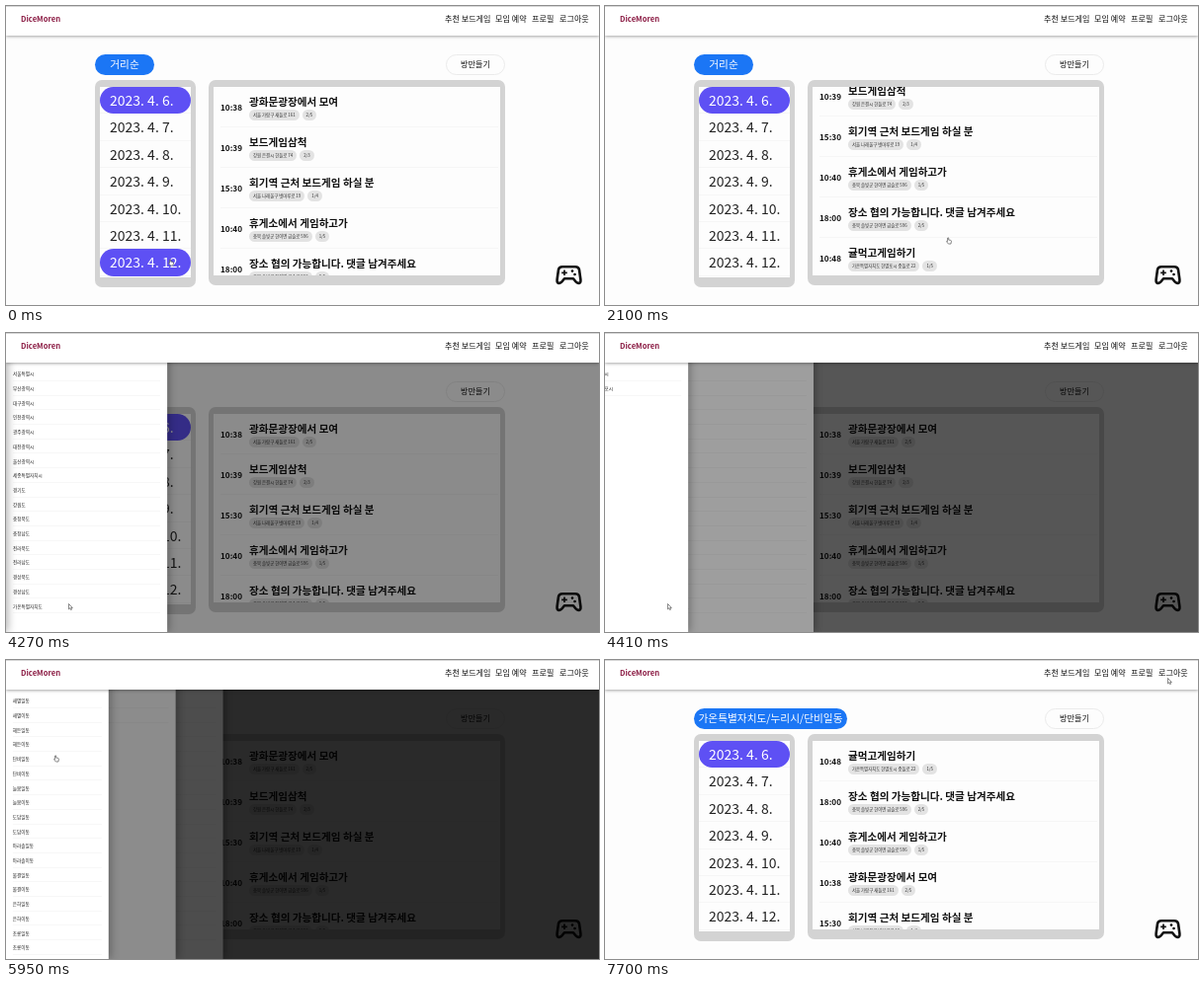
An HTML page for the animation above (7.91 s loop, 600 px wide and 303 px high).

```html
<!DOCTYPE html>
<html>
<head>
<meta charset="utf-8">
<style>
html, body { margin: 0; width: 100%; height: 100%; overflow: hidden; }
* { box-sizing: border-box; }
#stage {
  position: relative; width: 600px; height: 303px; overflow: hidden;
  background: #fdfdfd; color: #111; white-space: nowrap;
  font-family: "Noto Sans CJK KR", "Noto Sans CJK", "Noto Sans", sans-serif;
}
#stage div, #stage svg, header, header span { position: absolute; }
#stage .anim, .drawer, .mask, .swap-out, .swap-in, #cursor, #cursor path {
  animation-duration: 7910ms; animation-iteration-count: infinite;
}

header {
  left: 0; top: 0; width: 600px; height: 30px; background: #fff;
  border-top: 1px solid #d9d9d9; box-shadow: 0 1px 3px rgba(0,0,0,.35);
  font-size: 8.1px; font-weight: 500; line-height: 12px;
}
header span { top: 6px; }
header .logo { left: 15px; font-weight: 700; font-size: 7.7px; color: #8c1d45; }

.button { top: 49px; height: 21px; border-radius: 11px; line-height: 20px; text-align: center; }
.place { left: 90px; background: #1b76f5; color: #fff; font-size: 10.7px; font-weight: 500; }
.make { left: 445px; width: 60px; background: #fdfdfd; border: 1px solid #ebebeb; font-size: 8.1px; line-height: 18px; font-weight: 500; }

.panel { top: 75px; background: #d3d3d3; border-radius: 7px; }
.view { background: #fdfdfd; overflow: hidden; }
.date, .pill { left: 0; width: 92px; height: 27.4px; padding-left: 10px; font-size: 14px; line-height: 26px; }
.date { color: #222; border-bottom: 1px solid #f6f6f6; }
.pill { border-radius: 14px; background: #5e50f4; color: #fff; }

.list { left: 0; top: 0; width: 290px; height: 246px; }
.row { left: 7px; width: 281px; height: 41px; border-bottom: 1px solid #f6f6f6; }
.time { left: 0; top: 14px; font-size: 8.2px; font-weight: 700; line-height: 13px; }
.title { left: 29px; top: 7px; font-size: 10.6px; font-weight: 900; line-height: 15px; }
.tags { left: 29px; top: 23px; display: flex; gap: 3px; font-size: 4.4px; line-height: 10px; }
.tags span { height: 10.5px; padding: 0 4px; border-radius: 6px; background: #e3e3e3; color: #333; }

.mask { left: 0; top: 0; width: 600px; height: 303px; background: #000; opacity: 0; }
.drawer { left: 0; top: 0; height: 303px; background: #fff; box-shadow: 2px 0 8px rgba(0,0,0,.3); visibility: hidden; }
.item { left: 7px; right: 7px; height: 14.7px; font-size: 4.6px; line-height: 14px; color: #222; border-bottom: 1px solid #f7f7f7; }

.hover { animation-name: hover; }
@keyframes hover { 0%, 12.39% { opacity: 1; } 13.27%, 100% { opacity: 0; } }

.scroll { animation-name: scroll; animation-timing-function: ease-out; }
@keyframes scroll {
  0%, 15.04% { translate: 0 0; }
  19.47%, 21.24% { translate: 0 -42px; }
  23.01%, 26.7% { translate: 0 -52px; }
  30.09%, 100% { translate: 0 0; }
}

.swap-out { animation-name: swap-out; animation-timing-function: step-end; }
.swap-in { animation-name: swap-in; animation-timing-function: step-end; }
@keyframes swap-out { 0% { visibility: visible; } 75.6%, 100% { visibility: hidden; } }
@keyframes swap-in { 0% { visibility: hidden; } 75.6%, 100% { visibility: visible; } }

#mask1 { animation-name: dim1; }
#mask2 { animation-name: dim2; }
#mask3 { animation-name: dim3; }
@keyframes dim1 { 0%, 35.4% { opacity: 0; } 38.3%, 75.22% { opacity: .45; } 78.1%, 100% { opacity: 0; } }
@keyframes dim2 { 0%, 53.98% { opacity: 0; } 57.27%, 75.22% { opacity: .45; } 78.1%, 100% { opacity: 0; } }
@keyframes dim3 { 0%, 64.6% { opacity: 0; } 67.89%, 75.22% { opacity: .45; } 78.1%, 100% { opacity: 0; } }

#drawer1 { width: 162.5px; animation-name: slide1; }
#drawer2 { width: 100px; animation-name: slide2; }
#drawer3 { width: 104px; animation-name: slide3; }
@keyframes slide1 {
  0%, 35.4% { translate: -100% 0; visibility: hidden; }
  38.3%, 53.98% { translate: 0 0; visibility: visible; }
  57.27%, 75.22% { translate: 57px 0; visibility: visible; }
  78.1%, 100% { translate: -100% 0; visibility: hidden; }
}
@keyframes slide2 {
  0%, 53.98% { translate: -100% 0; visibility: hidden; }
  57.27%, 64.6% { translate: 0 0; visibility: visible; }
  67.89%, 75.22% { translate: 72px 0; visibility: visible; }
  78.1%, 100% { translate: -100% 0; visibility: hidden; }
}
@keyframes slide3 {
  0%, 64.6% { translate: -100% 0; visibility: hidden; }
  67.89%, 75.22% { translate: 0 0; visibility: visible; }
  78.1%, 100% { translate: -100% 0; visibility: hidden; }
}

#cursor { left: 0; top: 0; animation-name: move; animation-timing-function: ease-in-out; }
#cursor path { fill: #fff; stroke: #444; stroke-width: .8; stroke-linejoin: round; animation-timing-function: step-end; }
#cursor .hand { animation-name: hand; }
#cursor .arrow { animation-name: arrow; }
@keyframes move {
  0%, 12.39% { translate: 164px 256px; }
  13.27%, 14.16% { translate: 196px 273px; }
  15.04%, 30.09% { translate: 345px 234px; }
  34.51%, 39.8% { translate: 117px 59px; }
  51.3%, 57.27% { translate: 63px 274px; }
  61.95%, 68.27% { translate: 40px 43px; }
  73.45%, 78.76% { translate: 48px 96px; }
  84.96%, 85.84% { translate: 228px 119px; }
  87.6% { translate: 290px 178px; }
  89.38%, 91.15% { translate: 346px 150px; }
  97.1%, 100% { translate: 569px 18px; }
}
@keyframes hand { 0% { opacity: 1; } 30.1% { opacity: 0; } 75.2% { opacity: 1; } 92%, 100% { opacity: 0; } }
@keyframes arrow { 0% { opacity: 0; } 30.1% { opacity: 1; } 75.2% { opacity: 0; } 92%, 100% { opacity: 1; } }
</style>
</head>
<body>
<div id="stage"></div>
<script>
const meetings = [
  ["10:38", "광화문광장에서 모여", "서울 가람구 새들로 161", "2/5"],
  ["10:39", "보드게임삼척", "강원 은결시 한들로 74", "2/3"],
  ["15:30", "회기역 근처 보드게임 하실 분", "서울 나래울구 벗마루로 19", "1/4"],
  ["10:40", "휴게소에서 게임하고가", "충북 솔빛군 한이면 금슬로 596", "1/5"],
  ["18:00", "장소 협의 가능합니다. 댓글 남겨주세요", "충북 솔빛군 한이면 금슬로 596", "2/5"],
  ["10:48", "귤먹고게임하기", "가온특별자치도 한별포시 중들로 22", "1/5"]
];
const byDistance = [5, 4, 3, 0, 2, 1].map(i => meetings[i]);

const metro = ["부산", "대구", "인천", "광주", "대전", "울산"].map(n => n + "광역시");
const provinces = ["충청", "전라", "경상"].flatMap(n => [n + "북도", n + "남도"]);
const regions = ["서울특별시", ...metro, "세종특별자치시", "경기도", "강원도", ...provinces, "가온특별자치도"];
const cities = ["누리시", "한별포시"];
const towns = ["새별", "해든", "단비", "늘봄", "도담", "아라솔", "물결", "은하", "초롱"]
  .flatMap(n => [n + "일동", n + "이동"]);

const box = (cls, style, html = "") => `<div class="${cls}" style="${style}">${html}</div>`;

const day = (n, cls) => box(cls, `top:${(n - 6) * 27.4}px`, `2023. 4. ${n}.`);
const dates = Array.from({ length: 7 }, (_, i) => day(i + 6, "date")).join("");

const list = (rows, cls) => box("list " + cls, "", rows.map(([time, title, place, count], i) =>
  box("row", `top:${i * 41}px`,
    box("time", "", time) + box("title", "", title) +
    box("tags", "", `<span>${place}</span><span>${count}</span>`))).join(""));

const drawer = (n, names) => `<div class="mask" id="mask${n}"></div>
  <div class="drawer" id="drawer${n}">${names.map((name, i) =>
    box("item", `top:${34.3 + i * 14.7}px`, name)).join("")}</div>`;

document.getElementById("stage").innerHTML = `
  <div class="button place swap-out" style="width:60px">거리순</div>
  <div class="button place swap-in" style="width:155px">가온특별자치도/누리시/단비일동</div>
  <div class="button make">방만들기</div>

  <div class="panel" style="left:90px;width:102px;height:210px"></div>
  <div class="view" style="left:95px;top:82px;width:92px;height:193px">
    ${dates}${day(6, "pill")}${day(12, "pill anim hover")}
  </div>

  <div class="panel" style="left:205px;width:300px;height:208px"></div>
  <div class="view" style="left:210px;top:82px;width:290px;height:191px">
    <div class="anim scroll">${list(meetings, "swap-out")}</div>
    ${list(byDistance, "swap-in")}
  </div>

  <svg style="left:555px;top:261px" width="30" height="25" viewBox="555 261 30 25">
    <path d="M563 264.3h13q3.4 0 4 3l1.4 10q.4 3.6-2.2 3.6-1.6 0-2.8-1.6l-2.4-3h-9l-2.4 3q-1.2 1.6-2.8 1.6-2.6 0-2.2-3.6l1.4-10q.6-3 4-3z"
      fill="none" stroke="#111" stroke-width="2.6" stroke-linejoin="round"/>
    <path d="M565 267.500v5.600M562.200 270.300h5.600" stroke="#111" stroke-width="1.700"/>
    <circle cx="573" cy="268.600" r="1.300"/><circle cx="575.500" cy="272" r="1.300"/>
  </svg>

  ${drawer(1, regions)}${drawer(2, cities)}${drawer(3, towns)}

  <header>
    <span class="logo">DiceMoren</span>
    <span style="left:444px">추천 보드게임</span>
    <span style="left:495px">모임 예약</span>
    <span style="left:532px">프로필</span>
    <span style="left:560px">로그아웃</span>
  </header>

  <svg id="cursor" width="8" height="9.6" viewBox="0 0 10 12">
    <path class="arrow" d="M.6.6v6.8l1.6-1.4 1.1 2.3 1.1-.5-1-2.2h2z"/>
    <path class="hand" d="M2 5V1.300q.7-1 1.400 0v2.500l2.600.5q.9.300.8 1.300l-.6 3.200h-3.200l-2.400-3q.3-1 1.400-.2z"/>
  </svg>`;
</script>
</body>
</html>
```
